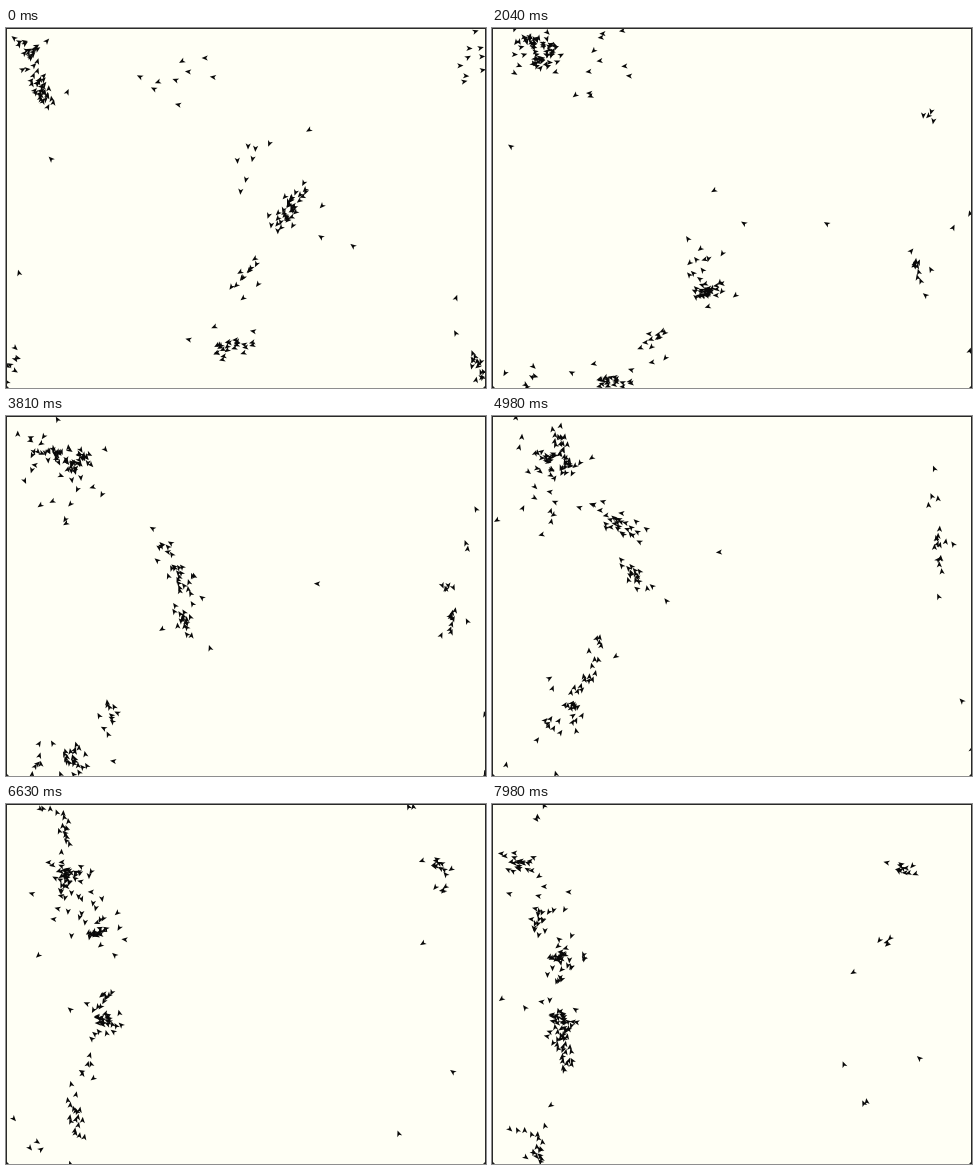
A matplotlib script that plays this animation: 480x360 px, repeating every 8 s.

```python
import numpy as np
import matplotlib.pyplot as plt
from matplotlib.animation import FuncAnimation
from matplotlib.collections import PolyCollection
from matplotlib.patches import Polygon, Rectangle

W, H = 480, 360
FRAMES, STEP = 250, 32
SECONDS = FRAMES * STEP / 1000
ARROW = np.array([(3.4, 0), (-2.8, 2.6), (-1.2, 0), (-2.8, -2.6)])
rng = np.random.default_rng(12)


def curve(points, t):
    """Smooth path through points evenly spaced in time, straight beyond them."""
    last = len(points) - 1
    s = t / SECONDS * last
    inside = np.clip(s, 0, last)
    k = np.minimum(inside.astype(int), last - 1)
    u = (inside - k)[:, None]
    slope = np.gradient(points, axis=0)
    a, b, m, n = points[k], points[k + 1], slope[k], slope[k + 1]
    pos = (a + u * m + u**2 * (3 * (b - a) - 2 * m - n)
           + u**3 * (2 * (a - b) + m + n))
    end = np.where((s < 0)[:, None], slope[0], slope[-1])
    return pos + (s - inside)[:, None] * end


class Flock:
    """Birds that follow one path, some early and some late, around a dense core."""

    def __init__(self, size, lag, spread, *points):
        self.points = np.array(points, float)
        self.lag = lag * rng.normal(size=size).clip(-1.8, 1.8)
        reach = spread * (0.4 + rng.exponential(0.5, size).clip(0, 1.6))
        self.offset = rng.normal(size=(size, 2)).clip(-1.8, 1.8) * reach[:, None]
        self.jitter = rng.normal(0, 0.25, size)

    def state(self, t):
        when = t - self.lag
        here = curve(self.points, when)
        ahead = curve(self.points, when + 0.05) - here
        return here + self.offset, np.arctan2(ahead[:, 1], ahead[:, 0]) + self.jitter


def loner(*points):
    return Flock(1, 0, 0, *points)


# paths may leave the stage, they wrap round when drawn
flocks = [
    # upper left
    Flock(18, 0.2, 6, (32, 55), (57, 20), (66, 49), (68, -20), (70, -125)),
    Flock(15, 0.3, 6, (40, 70), (48, 34), (80, 43), (68, 63), (50, 116)),
    Flock(17, 0.3, 9, (25, 26), (40, 14), (50, 41), (60, 37), (45, -16)),
    Flock(9, 0.3, 9, (-9, 27), (36, 18), (34, 40), (78, 78), (72, 168)),
    Flock(5, 0.3, 10, (15, 15), (34, 10), (20, 22), (24, -20), (38, -10)),
    Flock(7, 0.3, 20, (172, 50), (100, 42), (66, 90), (62, 90), (50, 90)),
    # centre
    Flock(22, 0.25, 6, (282, 178), (214, 264), (166, 146), (78, 78), (25, 60)),
    Flock(18, 0.25, 6, (283, 185), (213, 264), (173, 194), (106, 126), (66, 152)),
    Flock(7, 0.3, 8, (244, 140), (210, 236), (157, 130), (103, 110), (73, 170)),
    # bottom
    Flock(26, 0.2, 9, (225, 318), (120, 354), (65, 338), (106, 228), (68, 215)),
    Flock(12, 0.35, 9, (243, 245), (166, 312), (102, 296), (108, 195), (73, 230)),
    Flock(5, 0.2, 9, (6, 336), (37, 354), (30, 350), (76, 274), (74, 262)),
    # right
    Flock(12, 0.35, 6, (473, 341), (424, 243), (446, 200), (440, 72), (410, 66)),
    Flock(4, 0.1, 6, (470, -18), (436, 90), (442, 172), (446, 78), (390, 140)),
    # single birds
    loner((199, 30), (82, 75), (9, 196)),
    loner((152, 54), (40, 88), (-120, 169)),
    loner((45, 131), (-14, 88), (-129, -101)),
    loner((13, 245), (-23, 120), (-109, -62)),
    loner((450, 270), (460, 125), (374, -64)),
    loner((303, 102), (150, 218), (58, 302)),
    loner((315, 209), (190, 180), (66, 135)),
    loner((470, 352), (478, 296), (427, 254)),
    loner((347, 218), (335, 196), (303, 164), (140, 116), (78, 164)),
]


def arrows(t):
    pos, ang = map(np.concatenate, zip(*(f.state(t) for f in flocks)))
    c, s = np.cos(ang)[:, None], np.sin(ang)[:, None]
    x, y = ARROW.T
    shape = np.stack([x * c - y * s, x * s + y * c], axis=2)
    return shape + (pos % (W, H))[:, None]


fig = plt.figure(figsize=(W / 100, H / 100), dpi=100, facecolor="#fffff5")
ax = fig.add_axes([0, 0, 1, 1])
ax.set_xlim(0, W)
ax.set_ylim(H, 0)
ax.axis("off")

swarm = PolyCollection(arrows(0), facecolors="#080808", edgecolors="none")
ax.add_collection(swarm, autolim=False)

# thin frame on three sides, cut corners at the bottom
for x, y, w, h in ((0, 0, 1, H), (0, 0, W, 1), (W - 1, 0, 1, H)):
    ax.add_patch(Rectangle((x, y), w, h, color="#2a2a2a", lw=0, zorder=3))
for x, inner in ((0, 3), (W, W - 3)):
    ax.add_patch(Polygon([(x, H), (inner, H), (x, H - 3)], color="#222222",
                         lw=0, zorder=3))


def draw(i):
    swarm.set_verts(arrows(i * STEP / 1000))
    return [swarm]


anim = FuncAnimation(fig, draw, frames=FRAMES, interval=STEP, repeat=True,
                     repeat_delay=0, blit=False)
plt.show()
```
